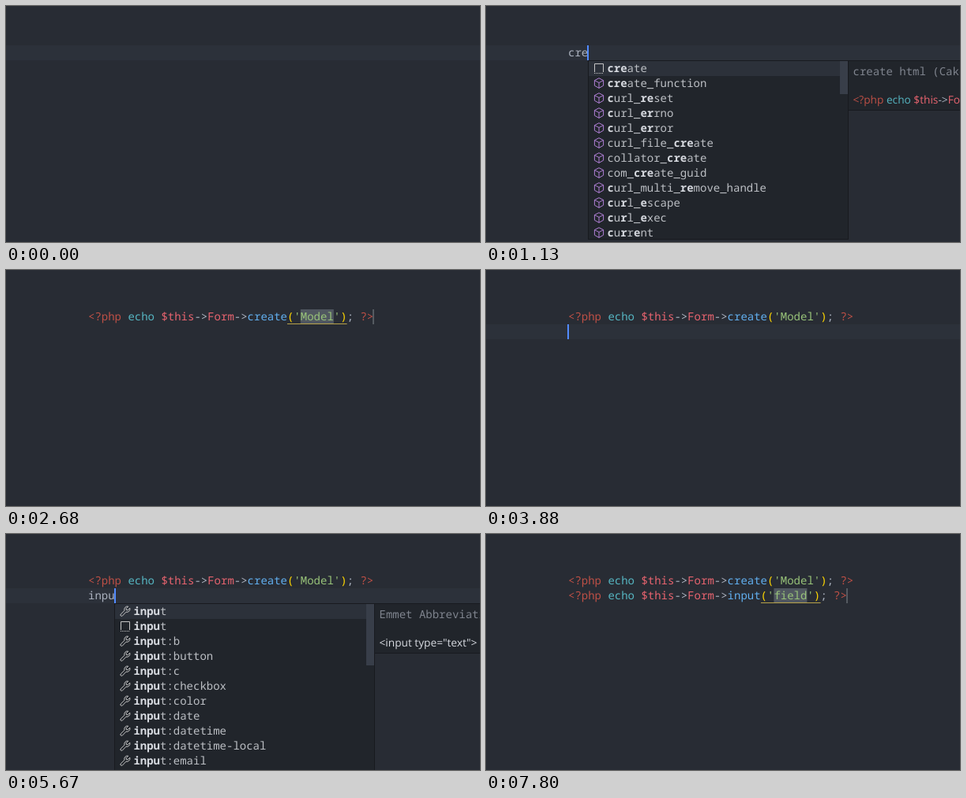
These frames come from a looping animation (600x300 px, 8000 ms). An HTML page with a canvas:

```html
<!DOCTYPE html>
<html lang="en">
<head>
<meta charset="utf-8">
<title>Snippet completion</title>
<style>
  html, body { margin: 0; width: 100%; height: 100%; overflow: hidden; background: #282c34; }
  canvas { display: block; }
</style>
</head>
<body>
<canvas id="stage" width="600" height="300"></canvas>
<script>
const ctx = document.getElementById('stage').getContext('2d');
const LOOP = 8000, CELL = 8.4, ROW = 19, LEFT = 104, TOP = 50, LIST_WIDTH = 330;
const MONO = '14px "Noto Sans Mono", "DejaVu Sans Mono", monospace';
const SANS = '"Open Sans", "Noto Sans", sans-serif';
const C = {
  bg: '#282c34', line: '#2c313a', panel: '#21252b', border: '#181a1f', thumb: '#383e49',
  text: '#abb2bf', item: '#bcbfc4', match: '#d7dae0', dim: '#7f848e', cursor: '#528bff',
  tag: '#be5046', echo: '#56b6c2', variable: '#e8646f', method: '#61afef',
  string: '#98c379', bracket: '#ffd700', selected: '#505760', marker: '#555a61'
};

const ICONS = {
  cube: ['#b180d7', 'M8 1.7 13.6 4.6V11.2L8 14.4 2.4 11.2V4.6ZM2.4 4.6 8 7.5 13.6 4.6M8 7.5V14.4'],
  '#': ['#c5c5c5', 'M2.5 13V2.5H13.5V13M2 14.5H3M4 14.5H5M6 14.5H7M8 14.5H9M10 14.5H11M12 14.5H13'],
  '=': ['#c5c5c5', 'M1.5 2.5H7V5.5H1.5ZM9 3.5H15M1 8.5H4M6 8.5H11M13 8.5H15M1 11.5H9M11 11.5H15M1 14.5H6M8 14.5H13'],
  '~': ['#c5c5c5', 'M13.8 4.2 11.3 6.7 9.3 6.6 9.2 4.6 11.7 2.1A4 4 0 0 0 7 7.3L2.2 12A1.5 1.5 0 0 0 4.3 14.1L9 9.2A4 4 0 0 0 13.8 4.2Z']
};
for (const icon of Object.values(ICONS)) icon[1] = new Path2D(icon[1]);

// Asterisks enclose matched letters; a leading #, = or ~ selects the icon.
const prefixed = (names, n) =>
  names.split(' ').map(s => s.replace(new RegExp(`^([#=~]?)(.{${n}})`), '$1*$2*'));

const C_ROWS = 'call_user_func call_user_func_array call_user_method call_user_method_array =callable =case =catch ceil chdir checkdate checkdnsrr chgrp';
const I_ROWS = 'iconv iconv_get_encoding iconv_mime_decode iconv_mime_decode_headers iconv_mime_encode iconv_set_encoding iconv_strlen iconv_strpos iconv_strrpos iconv_substr idate =if';
const IN_ROWS = 'in_array =include =include_once inet_ntop inet_pton inflate_add inflate_get_read_len inflate_get_status inflate_init ini_alter ini_get ini_get_all';
const INPUT_ROWS = '~input #input ~input:b ~input:button ~input:c ~input:checkbox ~input:color ~input:date ~input:datetime ~input:datetime-local ~input:email ~input:f';
const CR_ROWS = ['*cr*c32', '#*cr*eate', '*cr*eate_function', '*cr*ypt', '*c*h*r*', '*c*h*r*oot', '*c*u*r*l_close',
  '*c*u*r*l_errno', '*c*u*r*l_error', '*c*u*r*l_escape', '*c*u*r*l_exec', '*c*u*r*rent'];
const CRE_ROWS = ['#*cre*ate', '*cre*ate_function', '*c*url_*re*set', '*c*url_*er*rno', '*c*url_*er*ror',
  'curl_file_*cre*ate', 'collator_*cre*ate', 'com_*cre*ate_guid', '*c*url_multi_*re*move_handle',
  '*c*u*r*l_*e*scape', '*c*u*r*l_*e*xec', '*c*u*r*r*e*nt'];
const CREATE_ROWS = ['#*create*', '*create*_function', 'curl_file_*create*', 'collator_*create*', 'com_*create*_guid',
  '*c*ollato*r*_g*e*t_*at*tribut*e*', '*c*ollato*r*_s*e*t_*at*tribut*e*', '*c*l*e*a*r*st*at*cach*e*',
  '*c*u*r*l_sh*a*r*e*_s*t*r*e*rror', '*c*ollato*r*_g*et*_loc*a*l*e*', '*c*ollato*r*_g*et*_error_mess*a*g*e*'];
const CREA_ROWS = [...CREATE_ROWS.slice(0, 5).map(s => s.replace('create', 'crea*te*').replace('**', '')),
  '*c*u*r*l_*e*sc*a*pe', ...CREATE_ROWS.slice(5)];

const formCall = name => [['<?php', C.tag], [' echo ', C.echo], ['$this', C.variable], ['->', C.text],
  ['Form', C.variable], ['->', C.text], [name, C.method]];
const statement = (name, field, brackets) => [...formCall(name), ['(', brackets],
  [`'${field}'`, C.string], [')', brackets], ['; ', C.text], ['?>', C.tag]];

const prose = text => [[text, C.match]];
const doc = (head, body, size = 13.2) => ({ head, body, size });
const DOCS = {
  call: doc(['( callable $callback', '[, mixed $parameter'], prose('Call the callback given')),
  crc: doc(['( string $str )'], prose('Calculates the crc32')),
  create: doc(['create html (CakePHP)'], formCall('create'), 13.7),
  iconv: doc(['( string $in_charset', ', string $str )'], prose('Convert string to requested')),
  inArray: doc(['( mixed $needle , array', '[, bool $strict ] )'], prose('Checks if a value exists in')),
  emmet: doc(['Emmet Abbreviation'], prose('<input type="text">'), 13.7),
  input: doc(['input html (CakePHP)'], formCall('input'), 13.7)
};
const popup = (column, rows, doc, thumb = 0, selected = 0) => ({ column, rows, doc, thumb, selected });
const inputPopup = (column, n, selected = 0) =>
  popup(column, prefixed(INPUT_ROWS, n), selected ? DOCS.input : DOCS.emmet, 78, selected);
const typed = (line, text, list) => ({ typed: text, cursor: [line, text.length], ...(list && { list }) });
const insert = (line, name, field, plain) => {
  const start = 26 + name.length, end = start + field.length;
  return { typed: '', list: null, plain, brackets: C.text, calls: line + 1, highlight: -1,
    cursor: [line, end], pick: { line, start, end } };
};

// Each entry changes part of the state from its time onward.
const STEPS = [
  [0, { typed: '', cursor: null, list: null, calls: 0, highlight: 0, pick: null, plain: false, brackets: C.bracket, underline: false }],
  [320, { cursor: [0, 0] }],
  [630, typed(0, 'c')],
  [750, { list: popup(1, prefixed(C_ROWS, 1), DOCS.call, 10) }],
  [1000, typed(0, 'cr', popup(2, CR_ROWS, DOCS.crc, 20))],
  [1130, typed(0, 'cre', popup(3, CRE_ROWS, DOCS.create, 42))],
  [1380, typed(0, 'crea', popup(4, CREA_ROWS, DOCS.create))],
  [1740, typed(0, 'creat')],
  [1810, typed(0, 'create', popup(4, CREATE_ROWS, DOCS.create))],
  [2180, insert(0, 'create', 'Model', true)],
  [2250, { plain: false }],
  [2380, { brackets: C.bracket, underline: true }],
  [2680, { cursor: null }],
  [2930, { cursor: [0, 43], pick: null, highlight: 0 }],
  [3000, { underline: false }],
  [3430, { cursor: null }],
  [3810, { cursor: [1, 0], highlight: 1 }],
  [4310, { cursor: null }],
  [4800, { cursor: [1, 0] }],
  [4870, typed(1, 'i')],
  [4990, { list: popup(1, prefixed(I_ROWS, 1), DOCS.iconv, 10) }],
  [5120, typed(1, 'in', popup(2, prefixed(IN_ROWS, 2), DOCS.inArray, 29))],
  [5440, typed(1, 'inp')],
  [5490, { list: inputPopup(3, 3) }],
  [5670, typed(1, 'inpu', inputPopup(4, 4))],
  [5920, typed(1, 'input', inputPopup(4, 5))],
  [6420, { cursor: null, list: inputPopup(4, 5, 1) }],
  [6920, { cursor: [1, 5] }],
  [7300, insert(1, 'input', 'field', false)],
  [7550, { brackets: C.bracket, underline: true }],
  [7800, { cursor: null }]
];

const columnX = n => LEFT + n * CELL;
const lineY = n => TOP + n * ROW;

function rect(x, y, w, h, color) {
  ctx.fillStyle = color;
  ctx.fillRect(x, y, w, h);
}

function panel(x, y, w, h) {
  rect(x, y, w, h, C.border);
  rect(x + 1, y + 1, w - 2, h - 2, C.panel);
}

function mono(text, x, y, color, bold = false) {
  ctx.font = (bold ? 'bold ' : '') + MONO;
  ctx.fillStyle = color;
  ctx.fillText(text, x, y);
  return x + text.length * CELL;
}

function drawIcon([color, path], x, y) {
  ctx.save();
  ctx.translate(x, y);
  ctx.strokeStyle = color;
  ctx.stroke(path);
  ctx.restore();
}

function drawDoc({ head, body, size }, x, y) {
  panel(x, y, 600 - x + 2, 45 + ROW * head.length);
  head.forEach((text, i) => mono(text, x + 6.5, y + ROW * (i + 1), C.dim));
  ctx.font = `${size}px ${SANS}`;
  let pen = x + 6.5;
  for (const [text, color] of body) {
    ctx.fillStyle = color;
    ctx.fillText(text, pen, y + 36 + ROW * head.length);
    pen += ctx.measureText(text).width;
  }
}

function drawList({ column, rows, doc, thumb, selected }, line) {
  const x = Math.round(103.8 + column * CELL), y = lineY(line + 1);
  drawDoc(doc, x + LIST_WIDTH - 1, y);
  panel(x, y, LIST_WIDTH, ROW * rows.length);
  rect(x + 1, y + 1 + selected * ROW, LIST_WIDTH - 2, ROW, C.line);
  rows.forEach((row, i) => {
    const top = y + 1 + i * ROW, icon = ICONS[row[0]];
    drawIcon(icon || ICONS.cube, x + 6, top + 1);
    let pen = x + 24.4;
    row.slice(icon ? 1 : 0).split('*').forEach((part, k) => {
      pen = mono(part, pen, top + 14, k % 2 ? C.match : C.item, k % 2 === 1);
    });
  });
  rect(x + LIST_WIDTH - 11, y + 1, 10, thumb, C.thumb);
}

function drawCall(line, state) {
  const active = line === state.calls - 1;
  const tokens = statement(...[['create', 'Model'], ['input', 'field']][line], active ? state.brackets : C.bracket);
  let pen = LEFT;
  for (const [text, color] of tokens) {
    pen = mono(text, pen, lineY(line) + 14, active && state.plain ? C.text : color);
  }
}

function drawPick({ line, start, end }) {
  rect(columnX(start), lineY(line), columnX(end) - columnX(start), ROW, C.selected);
  rect(Math.round(columnX(end + 6)) - 1, lineY(line), 2, ROW, C.marker);
}

function draw(t) {
  const state = Object.assign({}, ...STEPS.filter(([at]) => at <= t).map(([, change]) => change));
  rect(0, 0, 600, 300, C.bg);
  if (state.highlight >= 0) rect(0, lineY(state.highlight), 600, ROW, C.line);
  if (state.pick) drawPick(state.pick);
  for (let line = 0; line < state.calls; line++) drawCall(line, state);
  if (state.underline) {
    const line = state.calls - 1, first = line ? 29 : 30;
    rect(Math.round(columnX(first)), lineY(line) + 18, 9 * CELL, 1, '#b9a34a');
  }
  mono(state.typed, LEFT, lineY(state.calls) + 14, C.text);
  if (state.list) drawList(state.list, state.calls);
  if (state.cursor) {
    const [line, column] = state.cursor;
    rect(Math.round(103.2 + column * CELL), lineY(line), 2, ROW, C.cursor);
  }
}

ctx.textRendering = 'geometricPrecision';
ctx.lineWidth = 1;
const began = performance.now();
function tick() {
  draw((performance.now() - began) % LOOP);
  requestAnimationFrame(tick);
}
tick();
</script>
</body>
</html>
```
